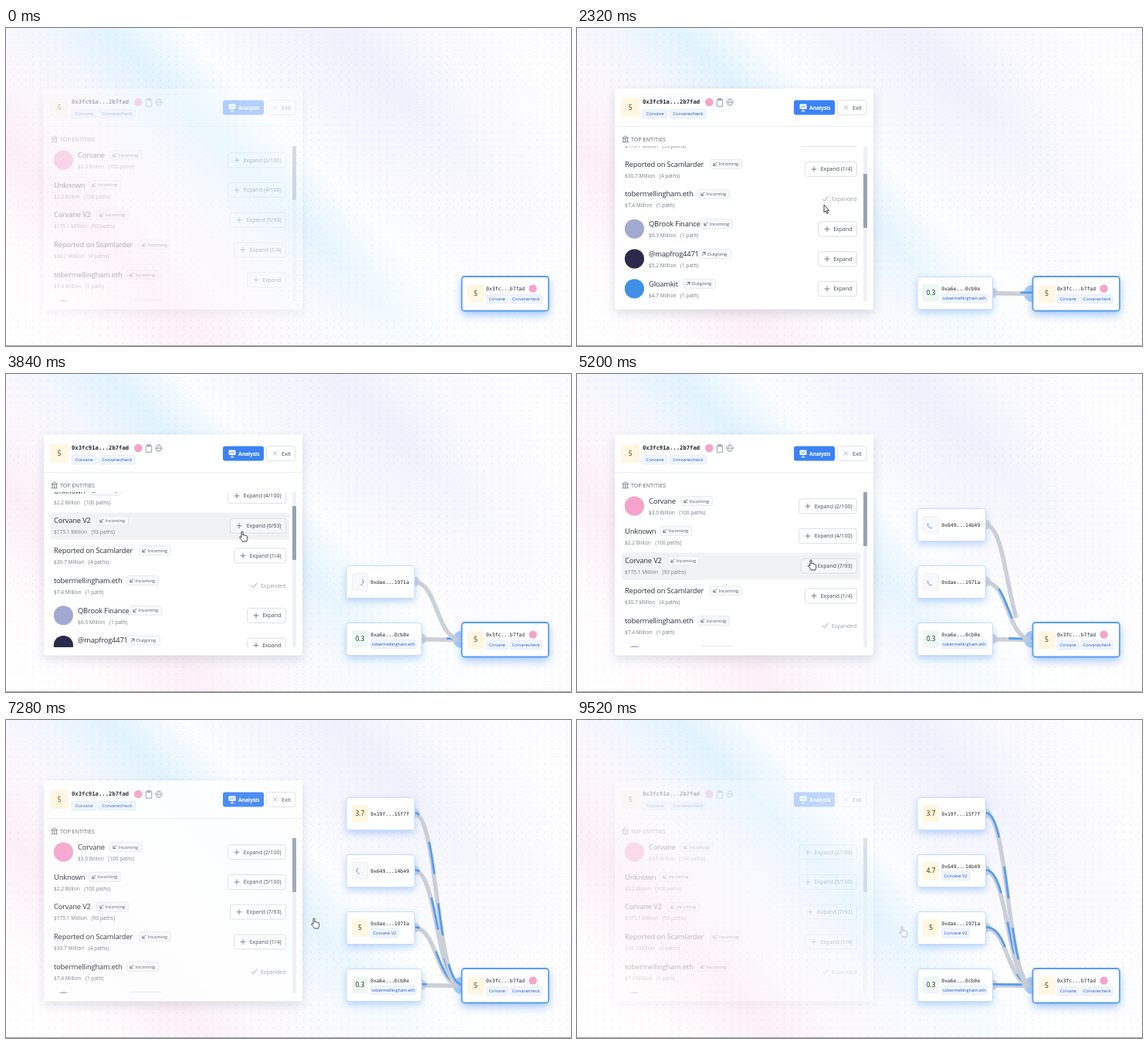
An HTML page with a canvas that plays this animation: 732x412 px, repeating every 9.6 s.

```html
<!DOCTYPE html>
<html lang="en">
<head>
<meta charset="utf-8">
<title>Entity panel</title>
<style>
  html, body { margin: 0; width: 100%; height: 100%; overflow: hidden; background: #fff; }
  canvas { display: block; }
</style>
</head>
<body>
<canvas id="stage" width="732" height="412"></canvas>
<script>
const W = 732, H = 412, LOOP = 9600, STEP = 80;
const SANS = '"Open Sans", "Noto Sans", sans-serif', MONO = '"DejaVu Sans Mono", monospace';
const BLUE = '#3b82f6', PINK = '#f5a3cb', INK = '#2b303a', GREY = '#747b88';

const stage = document.getElementById('stage').getContext('2d');
const newLayer = () => Object.assign(document.createElement('canvas'), { width: W, height: H }).getContext('2d');
const backdrop = newLayer(), panelLayer = newLayer();
let g = stage;

// Timing
const clamp = v => Math.max(0, Math.min(1, v));
const smooth = v => v * v * (3 - 2 * v);
function track(t, keys, ease = smooth) {
  if (t <= keys[0][0]) return keys[0][1];
  for (let i = 1; i < keys.length; i++) {
    const [t0, a] = keys[i - 1], [t1, b] = keys[i];
    if (t < t1) return a + (b - a) * ease((t - t0) / (t1 - t0));
  }
  return keys[keys.length - 1][1];
}

const CLICKS = { eth: 1480, second: 3300, third: 4780, unknown: 5840 };
const panelAlpha = t => track(t, [[0, .36], [770, 1], [7180, 1], [8250, 0], [9170, 0], [9600, .36]], v => v);
const scrollAt = t => track(t, [[450, 0], [1050, 104.5], [2500, 104.5], [3050, 52], [4300, 52], [4750, 0]]);
const cursorX = t => track(t, [[300, 400], [1050, 318], [2500, 318], [3100, 305], [4300, 305], [4750, 302],
  [6600, 302], [7280, 398], [7700, 420]]);
const cursorY = t => track(t, [[300, 300], [1050, 230], [2500, 230], [3100, 204], [4300, 204], [4750, 241],
  [5250, 241], [5650, 208], [6600, 208], [7280, 257], [7700, 268]]);

// Drawing helpers
function text(str, x, mid, size, color, { weight = 400, font = SANS, align = 'left', spacing = 0 } = {}) {
  g.font = `${weight} ${size}px ${font}`;
  g.textAlign = align;
  g.letterSpacing = spacing + 'px';
  g.fillStyle = color;
  g.fillText(str, x, mid + size * .36);
  return g.measureText(str).width;
}
function box(x, y, w, h, r, fill, stroke, line = 1) {
  g.beginPath();
  g.roundRect(x, y, w, h, r);
  if (fill) { g.fillStyle = fill; g.fill(); }
  if (stroke) { g.strokeStyle = stroke; g.lineWidth = line; g.stroke(); }
}
function disc(x, y, r, fill) {
  g.beginPath();
  g.arc(x, y, r, 0, 7);
  g.fillStyle = fill;
  g.fill();
}
function line(d, color, width = 1, x = 0, y = 0) {
  g.save();
  g.translate(x, y);
  g.strokeStyle = color;
  g.lineWidth = width;
  g.lineCap = g.lineJoin = 'round';
  g.stroke(new Path2D(d));
  g.restore();
}
function shadow(color, blur, dy, draw) {
  g.save();
  g.shadowColor = color;
  g.shadowBlur = blur;
  g.shadowOffsetY = dy;
  draw();
  g.restore();
}
function tag(str, x, y, w, h, size) {
  box(x, y, w, h, 2, '#eff5ff', '#dce8fd', .7);
  text(str, x + w / 2, y + h / 2, size, '#2453c9', { align: 'center' });
}
function badge(str, x, y, w, h, green) {
  box(x, y, w, h, 2.5, green ? '#eef7f3' : '#fff7e2');
  text(str, x + w / 2, y + h / 2, 8.2, green ? '#40604f' : '#70592a', { weight: 600, align: 'center' });
}

function paintBackdrop() {
  g = backdrop;
  g.fillStyle = '#fff';
  g.fillRect(0, 0, W, H);
  const bands = g.createLinearGradient(0, H, 572, -160);
  [[-412, '#fff'], [-290, '#fffdfe'], [-150, '#fdeff6'], [-60, '#fcf7fc'], [30, '#f5f7fe'], [130, '#e2f3fe'],
   [225, '#fbfdff'], [300, '#f7f7fe'], [430, '#f1f1fd'], [540, '#f9f9fe'], [640, '#fdfdff'], [732, '#fafaff']]
    .forEach(([u, color]) => bands.addColorStop((u + 412) / 1144, color));
  g.fillStyle = bands;
  g.fillRect(0, 0, W, H);
  const fade = g.createLinearGradient(300, 300, 500, 500);
  fade.addColorStop(0, 'rgba(255,255,255,0)');
  fade.addColorStop(1, 'rgba(255,255,255,.85)');
  g.fillStyle = fade;
  g.fillRect(0, 0, W, H);
  g.fillStyle = 'rgba(120,135,175,.22)';
  for (let y = 8; y < H; y += 9.75)
    for (let x = 5; x < W; x += 9.75) g.fillRect(Math.round(x), Math.round(y), 1, 1);
  g.fillStyle = '#a3a3a6';
  g.fillRect(0, 411, W, 1);
}

// Entity list: name, amount, paths, tag position, icon colour, button caption
const ROWS = [
  ['Corvane', '$3.0 Billion', '(100 paths)', 134, PINK, () => 'Expand (2/100)'],
  ['Unknown', '$2.2 Billion', '(100 paths)', 107, null, t => `Expand (${t < CLICKS.unknown ? 4 : 5}/100)`],
  ['Corvane V2', '$175.1 Million', '(93 paths)', 117, null,
    t => `Expand (${5 + (t >= CLICKS.second) + (t >= CLICKS.third)}/93)`],
  ['Reported on Scamlarder', '$30.7 Million', '(4 paths)', 172, null, () => 'Expand (1/4)'],
  ['tobermellingham.eth', '$7.4 Million', '(1 path)', 156, null, t => t < CLICKS.eth ? 'Expand' : ''],
  ['QBrook Finance', '$6.3 Million', '(1 path)', 160, '#a3aad2', () => 'Expand'],
  ['@mapfrog4471', '$5.2 Million', '(1 path)', 157, '#2c2a4a', () => 'Expand', true],
  ['Gloamkit', '$4.7 Million', '(1 path)', 137, '#3f8fe9', () => 'Expand', true],
];

function drawRow([name, amount, paths, tagX, icon, caption, outgoing], y, t) {
  const label = caption(t), cx = cursorX(t), cy = cursorY(t);
  const hover = t > 900 && label && cx < 367 && cy > y - 10.5 && cy < y + 24.5;
  const x = icon ? 93 : 62;
  if (hover) box(58, y - 10.5, 309, 35, 3, '#f1f2f4');
  if (icon) disc(74.4, y + 6.5, 12.6, icon);
  text(name, x, y, 9.4, INK, { spacing: -.2, weight: 500 });

  box(tagX + .5, y - 6, 41 + !!outgoing, 12, 2.5, '#f8f9fb', '#e2e5ea', .8);
  const arrow = outgoing ? 'M0 4L4 0M1 0H4V3' : 'M4 0L0 4M0 1V4H3';
  line(arrow, '#4b5260', .8, tagX + 5, y - 2);
  text(outgoing ? 'Outgoing' : 'Incoming', tagX + 11.5, y, 6, '#555c69');

  const w = text(amount, x, y + 15, 6.6, GREY);
  text(paths, x + w + 5.5, y + 15, 6.6, GREY);

  const mid = y + 6.7;
  if (!label) {
    line('M0 3L2.5 5.5L7 0', '#9aa1ad', 1, 318, mid - 3);
    text('Expanded', 362.5, mid, 7, '#9aa1ad', { align: 'right', weight: 500 });
    return;
  }
  const left = { 6: 312.5, 12: 295.5, 13: 290.5, 14: 287.5 }[label.length];
  box(left, mid - 9.5, 362.5 - left, 19, 3, hover ? '#f5f6f8' : '#fff', '#d9dce3', .9);
  line('M-3 0H3M0 -3V3', '#59606d', .8, left + 11.5, mid);
  text(label, 356.5, mid, 7, '#414753', { align: 'right', weight: 500 });
}

function drawHeader() {
  badge('5', 57, 90.5, 24, 24.5);
  text('0x3fc91a...2b7fad', 85, 95.5, 7.25, '#20242c', { weight: 700, font: MONO });
  disc(171.3, 96, 5.3, PINK);
  line('M0 1.5H7V10H0ZM2 0H5V2.5H2Z', '#7d8491', .8, 181.7, 91.3);
  line('M-4.2 0A4.2 4.2 0 1 0 4.2 0A4.2 4.2 0 1 0 -4.2 0H4.2M0 -4.2C-2.7 -2 -2.7 2 0 4.2C2.7 2 2.7 -2 0 -4.2',
    '#8990a0', .7, 198, 96.2);
  tag('Corvane', 85, 105.5, 32, 11.5, 6);
  tag('Corvanecheck', 120, 105.5, 47.5, 11.5, 6);

  box(281, 93.5, 53, 19, 3, BLUE);
  box(288.5, 98.5, 9, 6.5, 1, '#fff');
  line('M4.5 7V9M2.5 9.3H6.5', '#fff', 1, 288.5, 98.5);
  line('M0 3L2 1L4 2.5L6 0', BLUE, .8, 290, 100.2);
  text('Analysis', 301, 103, 7, '#fff', { weight: 700, spacing: -.2 });
  box(337.5, 93.5, 37.5, 19, 3, '#fff', '#dadde4', .9);
  line('M-2.3 -2.3L2.3 2.3M2.3 -2.3L-2.3 2.3', '#8b919d', .7, 348.5, 103);
  text('Exit', 357, 103, 7, '#414753', { weight: 500 });

  g.fillStyle = '#eceef2';
  g.fillRect(49, 127, 335, 1);
  line('M0 2.8L3.7 0L7.4 2.8ZM1 4V7M3.7 4V7M6.4 4V7M0 8H7.4', '#5b6270', .8, 59, 139.8);
  text('TOP ENTITIES', 70, 144, 7.2, '#5b6270');
}

function drawPanel(t) {
  g = panelLayer;
  g.clearRect(0, 0, W, H);
  shadow('rgba(50,65,110,.17)', 14, 5, () => box(49, 78.5, 335, 286, 3, '#fff'));
  drawHeader();
  const scroll = scrollAt(t);
  g.save();
  g.beginPath();
  g.rect(49, 153, 335, 201);
  g.clip();
  ROWS.forEach((row, i) => drawRow(row, 164.5 + i * 38.75 - scroll, t));
  g.restore();
  box(371, 153, 5, 201, 1, '#eff1f4');
  box(371, 153 + scroll * .345, 5, 70, 1, '#98a3b3');
}

// Graph
const NODES = [
  { addr: '0xa6e...0cb0e', y: 322.5, w: 97.5, born: 1640, done: 2080, score: '0.3', label: 'tobermellingham.eth', tagW: 59 },
  { addr: '0xdae...1971a', y: 248.5, w: 88.5, born: 3440, done: 6080, score: '5', label: 'Corvane V2', tagW: 36.5 },
  { addr: '0x649...14b49', y: 174.5, w: 88.5, born: 4880, done: 7840, score: '4.7', label: 'Corvane V2', tagW: 36.5 },
  { addr: '0x19f...15f7f', y: 100.5, w: 88.5, born: 6000, done: 6880, score: '3.7' },
];

function drawEdge(node, t) {
  const x = 441 + node.w, y = node.y + 20.5, grow = clamp((t - node.born - 160) / 320);
  if (!grow) return;
  const curve = (dx, dy) => {
    g.beginPath();
    g.moveTo(x + dx, y + dy);
    g.bezierCurveTo(x + 30 + dx, y + dy, 557 + dx, 343.5 + dy, 590 + dx, 343.5 + dy);
  };
  g.save();
  disc(x, y, 6.5, '#d0d5de');
  g.setLineDash([260 * grow, 400]);
  g.strokeStyle = '#cbcfd7';
  g.lineWidth = 5.5;
  curve(0, .8);
  g.stroke();
  if (grow === 1) {
    g.setLineDash([42, 38]);
    g.lineDashOffset = -t / LOOP * 80 * 6;
    g.strokeStyle = '#559df5';
    g.lineWidth = 2.8;
    curve(.6, -.7);
    g.stroke();
  }
  g.restore();
}

function drawNode({ addr, y, w, born, done, score, label, tagW }, t) {
  const ready = t >= done, tagged = ready && label;
  g.save();
  g.globalAlpha = clamp((t - born) / 320);
  shadow('rgba(75,145,245,.38)', 10, 4, () => box(441, y, w, 42, 3, '#fff'));
  box(441, y, w, 42, 3, '#fff', '#c3dcfa', 1);
  if (ready) badge(score, 448, y + 9.5, 21, 22.5, score < 1);
  else {
    box(448.5, y + 10, 20, 21.5, 2.5, '#f7f8fa', '#eceef2', .8);
    const a = t / 1000 * 2 * Math.PI;
    g.beginPath();
    g.arc(458.7, y + 20.8, 4.2, a, a + 2.4);
    g.strokeStyle = '#5a8fe6';
    g.lineWidth = 1;
    g.stroke();
  }
  text(addr, 472.3, y + (tagged ? 15 : 20.7), 6.4, '#20242c', { font: MONO, weight: 500 });
  if (tagged) tag(label, 472.3, y + 21.8, tagW, 11.5, 5.7);
  g.restore();
}

function drawRoot(linked) {
  if (linked) disc(590, 344, 11, '#a9cdfa');
  shadow('rgba(65,140,250,.5)', 12, 5, () => box(590.5, 322, 112.5, 44.5, 3.5, '#fff'));
  box(590.5, 322, 112.5, 44.5, 3.5, '#fff', '#5b9cf0', 1.8);
  badge('5', 597.5, 333, 22, 23);
  text('0x3fc...b7fad', 622, 337.3, 6.4, '#20242c', { font: MONO, weight: 500 });
  disc(682.6, 337.6, 5.2, PINK);
  tag('Corvane', 622.3, 345.5, 28, 11.5, 5.5);
  tag('Corvanecheck', 653, 345.5, 41.5, 11.5, 5.5);
}

const HAND = new Path2D('M0 1C0 -.6 2 -.6 2 1V5C2.2 4 3.9 4 4 5.3C4.4 4.6 5.9 4.8 6 6C6.6 5.4 7.8 5.8 7.8 7V9.2' +
  'C7.8 11 6.8 11.5 6.8 13H1.4C1 11.2 -1.2 9.8 -2.2 7.8C-2.6 6.6 -1.2 6 -.5 7L0 7.7Z');
const ARROW = new Path2D('M2 -1V9L4.2 7L5.8 10.5L7.3 9.8L5.7 6.4H8.6Z');

function drawCursor(t) {
  const arrow = t >= CLICKS.eth && t < 2700;
  g.save();
  g.globalAlpha = panelAlpha(t) * clamp((t - 400) / 240);
  g.translate(cursorX(t), cursorY(t));
  g.fillStyle = '#fff';
  g.strokeStyle = '#2a2a2e';
  g.lineWidth = .9;
  g.lineJoin = 'round';
  g.fill(arrow ? ARROW : HAND);
  g.stroke(arrow ? ARROW : HAND);
  g.restore();
}

function frame() {
  const t = Math.floor(performance.now() / STEP) * STEP % LOOP;
  drawPanel(t);
  g = stage;
  g.drawImage(backdrop.canvas, 0, 0);
  g.globalAlpha = panelAlpha(t);
  g.drawImage(panelLayer.canvas, 0, 0);
  g.globalAlpha = 1;
  const visible = NODES.filter(n => t > n.born);
  if (visible.length) disc(590, 344, 11, '#a9cdfa');
  visible.forEach(n => drawEdge(n, t));
  visible.forEach(n => drawNode(n, t));
  drawRoot(false);
  drawCursor(t);
  requestAnimationFrame(frame);
}

paintBackdrop();
frame();
</script>
</body>
</html>
```
